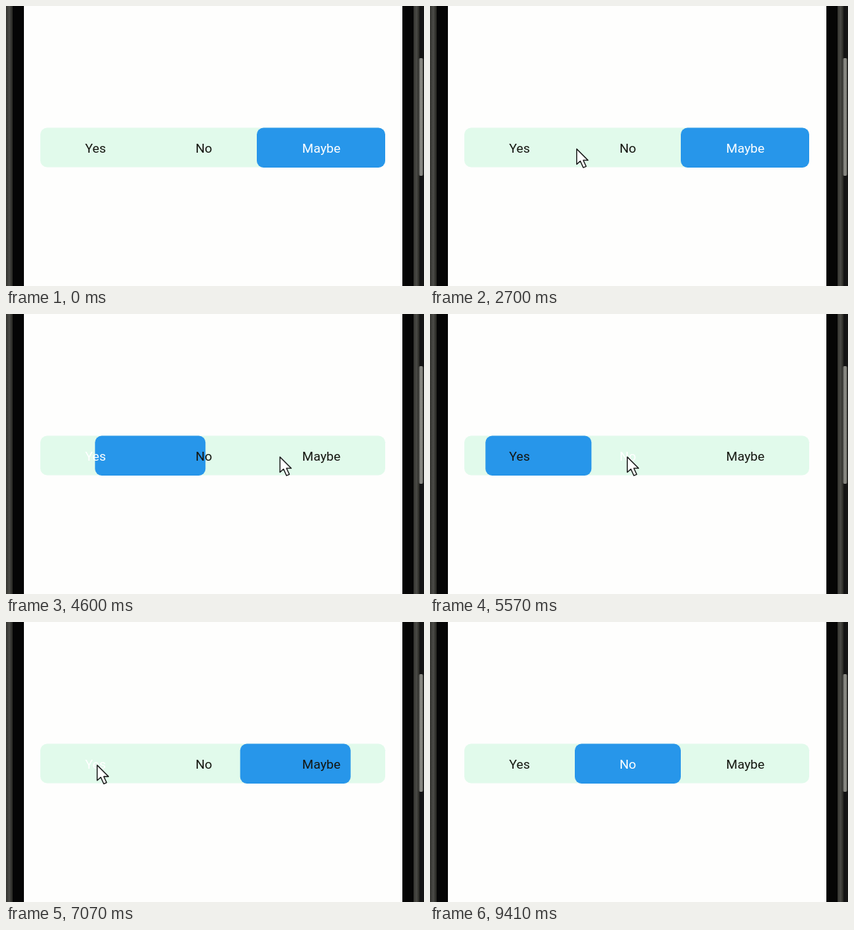
Recreate the animation shown at these times as an HTML page. Size 560x376 px, loop 9440 ms.

```html
<!DOCTYPE html>
<html lang="en">
<head>
<meta charset="utf-8">
<title>Segmented control</title>
<style>
  html, body { margin: 0; width: 100%; height: 100%; overflow: hidden; background: #fefefd; }
  svg { display: block; width: 560px; height: 376px; }
  text { font: 17.3px Roboto, sans-serif; text-anchor: middle; }
</style>
</head>
<body>
<svg viewBox="0 0 560 376">
  <defs>
    <linearGradient id="metal">
      <stop offset="0" stop-color="#33332f"/>
      <stop offset=".5" stop-color="#4b4b47"/>
      <stop offset="1" stop-color="#24241f"/>
    </linearGradient>
    <linearGradient id="key">
      <stop offset="0" stop-color="#4a4a46"/>
      <stop offset=".5" stop-color="#999993"/>
      <stop offset="1" stop-color="#55554f"/>
    </linearGradient>
  </defs>

  <rect width="560" height="376" fill="#050505"/>
  <rect x="24" width="507" height="376" fill="#fefefd"/>
  <rect width="9" height="376" fill="url(#metal)"/>
  <rect x="546" width="8" height="376" fill="url(#metal)"/>
  <rect x="554" width="6" height="376" fill="#141414"/>
  <rect x="553" y="70" width="6" height="158" rx="2" fill="url(#key)"/>

  <rect x="46" y="163.5" width="462" height="53" rx="9" fill="#e1faeb"/>
  <rect id="pill" y="163.5" height="53.5" rx="9" fill="#2796ea"/>
  <g id="labels">
    <text x="120" y="197">Yes</text>
    <text x="265" y="197">No</text>
    <text x="422.5" y="197">Maybe</text>
  </g>
  <path id="cursor" d="M0 0V20.5L4.8 16.2L8.8 25L12.6 23.3L8.8 15.2H15.2Z"
        fill="#fff" stroke="#111" stroke-width="1.3" stroke-linejoin="round"/>
</svg>

<script>
const LOOP = 9440, SLIDE = 300, ENTER = 100, EXIT = 8600;
const edges = [46, 194, 336, 508];
const YES = 0, NO = 1, MAYBE = 2;

// Swipes: [start time, selected segment]
const swipes = [
  [-SLIDE, MAYBE], [3320, NO], [4450, YES], [5487, NO],
  [6281, MAYBE], [7020, YES], [7900, NO]
];

// Turning points of the pointer's sideways sweeps: [time, x]
const turns = [
  [ENTER, 330], [1000, 470], [1500, 128], [2000, 478], [2540, 126], [3100, 478],
  [4090, 130], [4400, 425], [5230, 32], [5830, 418], [6210, 120], [6680, 498],
  [7180, 70], [8080, 420], [EXIT, 390]
];
// Moments when the hand drops below the control
const dips = [1500, 3955, 7340];

const pill = document.getElementById("pill");
const cursor = document.getElementById("cursor");
const labels = [...document.querySelectorAll("#labels text")];

const mix = (a, b, p) => a + (b - a) * p;
const ease = p => {
  const c = Math.min(1, Math.max(0, p));
  return c * c * (3 - 2 * c);
};

function drawControl(t) {
  const i = swipes.findLastIndex(([start]) => start <= t);
  const [start, selected] = swipes[i];
  const previous = swipes[Math.max(0, i - 1)][1];
  pill.setAttribute("x", mix(edges[previous], edges[selected], ease((t - start) / SLIDE)));
  pill.setAttribute("width", edges[selected + 1] - edges[selected]);
  labels.forEach((label, n) => label.setAttribute("fill", n === selected ? "#fff" : "#14150f"));
}

function pointerX(t) {
  const next = turns.findIndex(([time]) => time > t);
  const [t0, x0] = turns[next - 1];
  const [t1, x1] = turns[next];
  return mix(x0, x1, ease((t - t0) / (t1 - t0)));
}

function pointerY(t) {
  const offstage = 1 - ease((t - ENTER) / 900) + ease((t - EXIT + 500) / 500);
  const dip = dips.reduce((sum, at) => sum + Math.exp(-(((t - at) / 110) ** 2)), 0);
  return 192 + 190 * offstage + 112 * dip;
}

function drawCursor(t) {
  const visible = t >= ENTER && t < EXIT;
  cursor.style.visibility = visible ? "visible" : "hidden";
  if (visible) cursor.setAttribute("transform", `translate(${pointerX(t)} ${pointerY(t)})`);
}

const begin = performance.now();
function frame() {
  const t = (performance.now() - begin) % LOOP;
  drawControl(t);
  drawCursor(t);
  requestAnimationFrame(frame);
}
frame();
</script>
</body>
</html>
```
